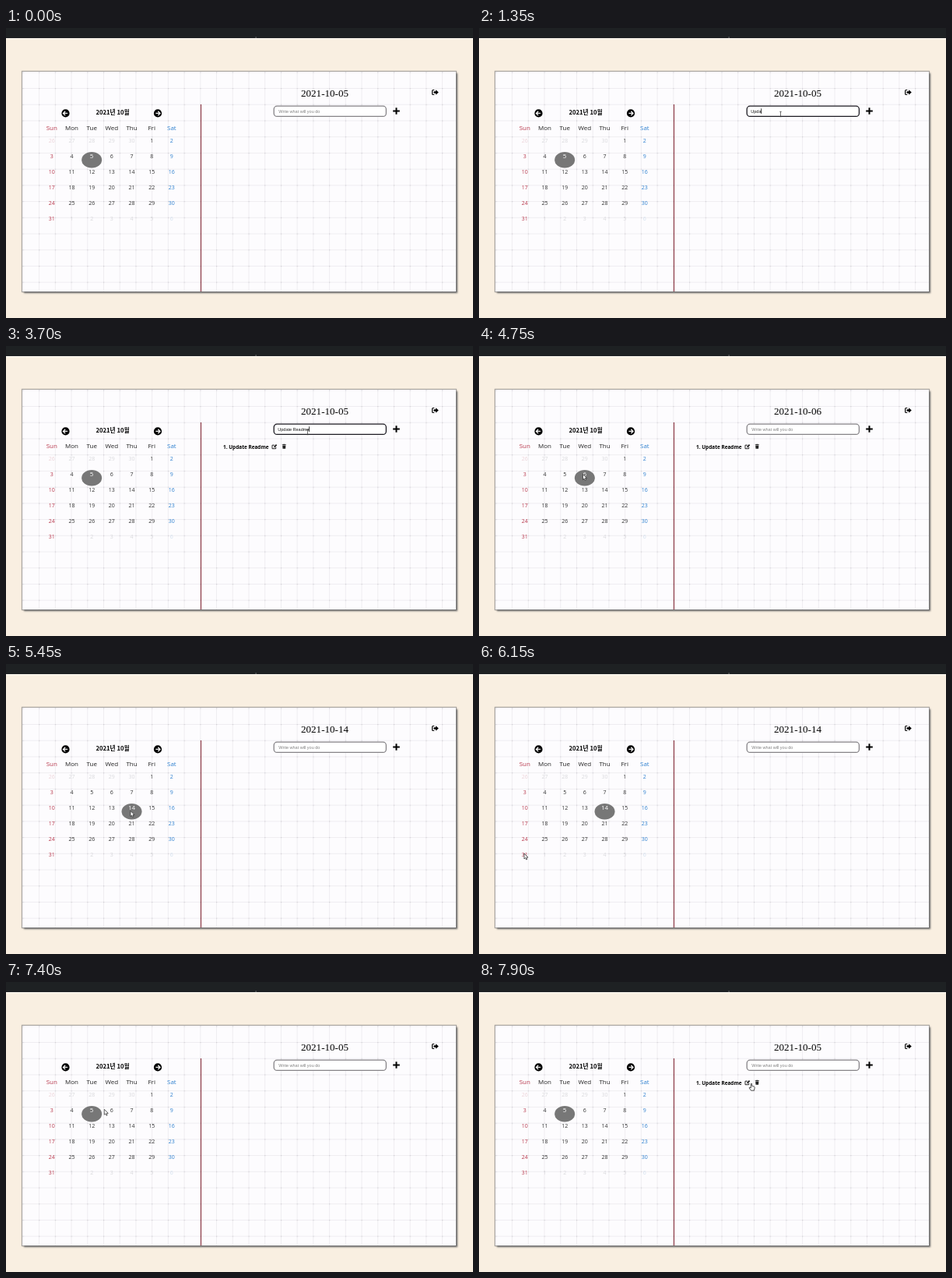
Recreate the animation shown at these times as an HTML page. Size 600 px wide and 372 px high, loop 8 s.

```html
<!DOCTYPE html>
<html lang="en">
<head>
<meta charset="utf-8">
<title>Calendar to-do</title>
<style>
  html, body { margin: 0; width: 100%; height: 100%; overflow: hidden; background: #f9efe1; }
  #bar { position: absolute; inset: 0 0 auto; height: 12.5px; background: #1e2123; box-shadow: 0 1px 1px #fffaf2; }
  #panel { position: absolute; left: 21px; top: 56px; width: 557px; height: 282px; background: #fdfcfe;
           box-shadow: 0 0 1px 1px #77777799, 2px 2px 2px #666; }
  svg { position: absolute; left: 0; top: 0; width: 600px; height: 372px; }
  text { white-space: pre; }
  .ui { font-family: "Open Sans", "Noto Sans", sans-serif; text-anchor: middle; }
  .field { font: 5.5px "Liberation Sans", Arial, sans-serif; }
</style>
</head>
<body>
<div id="bar"></div>
<div id="panel"></div>
<svg viewBox="0 0 600 372">
  <defs>
    <pattern id="grid" x="21.4" y="56.3" width="20.72" height="20.72" patternUnits="userSpaceOnUse">
      <path d="M0 .5H20.72M.5 0V20.72" stroke="#efedf1"/>
      <rect width="1.2" height="1.2" fill="#cfced3"/>
    </pattern>
    <g id="arrowIcon">
      <circle r="5.1"/>
      <path d="M-2.6 0H2.8M.3 -2.7L3 0L.3 2.7" fill="none" stroke="#fff" stroke-width="1.3"/>
    </g>
  </defs>
  <rect x="320.5" y="11.5" width="1.2" height="1.2" fill="#8a8c8d"/>
  <rect x="21" y="56" width="557" height="282" fill="url(#grid)"/>
  <path d="M250.5 98V338" stroke="#8d3b46" stroke-width="1.2"/>

  <use href="#arrowIcon" transform="translate(76.5 109.4) scale(-1 1)"/>
  <use href="#arrowIcon" transform="translate(195 109.4)"/>
  <text x="137" y="111.2" text-anchor="middle" font-size="7.7" font-weight="700"
        font-family="'Noto Sans CJK KR', 'Noto Sans CJK', sans-serif">2021년 10월</text>
  <g id="calendar" class="ui"></g>

  <text id="date" x="409.5" y="88" font-size="13.1" text-anchor="middle" font-family="'Liberation Serif', serif"></text>
  <!-- sign-out icon -->
  <path d="M550.3 79.5H548.6Q547.7 79.5 547.7 80.4V84.6Q547.7 85.5 548.6 85.5H550.3" fill="none" stroke="#000" stroke-width="1.2"/>
  <path d="M549.6 81.3H552.2V79.2L555.8 82.5L552.2 85.8V83.7H549.6Z"/>

  <rect id="box" x="344.2" y="100.2" width="144.2" height="13.2" rx="4" fill="#fff" stroke-width="1.3"/>
  <text id="entry" class="field" y="108.7"></text>
  <path id="caret" stroke="#000" stroke-width=".8"/>
  <path d="M497.2 106.5H505.8M501.5 102.2V110.8" stroke="#000" stroke-width="2"/>

  <g id="todo">
    <text class="ui" x="308.3" y="131.6" font-size="6.45" font-weight="700">1. Update Readme</text>
    <path d="M345 127.2H342V131.7H346.7V129.6" fill="none" stroke="#111" stroke-width=".9"/>
    <path d="M344 130.2L344.3 128.9L346.9 126.1L348.2 127.3L345.4 130Z" fill="#111"/>
    <path d="M354.8 126.3H356.2L356.6 125.8H358L358.4 126.3H359.8V127.1H354.8ZM355.2 127.5H359.4L359.1 131.8H355.5Z" fill="#222"/>
  </g>

  <g id="pointer" stroke-linejoin="round">
    <path data-kind="beam" d="M-1.2 -3.2H1.2M0 -3.2V3.2M-1.2 3.2H1.2" stroke="#333" stroke-width=".7"/>
    <path data-kind="arrow" d="M0 0V7L1.6 5.6L2.7 8L3.9 7.5L2.9 5.1H5Z" fill="#fff" stroke="#222" stroke-width=".7"/>
    <path data-kind="hand" d="M-.7 .6Q0 -.6 .7 .6V3.4L3.6 4.2Q4.4 4.5 4.2 5.6L3.4 9.2H-.5L-2.8 6Q-3 4.8 -1.8 5.2L-.7 6Z" fill="#fff" stroke="#222" stroke-width=".8"/>
  </g>
</svg>
<script>
const LOOP = 8000, BLINK = 500, TEXT_X = 349.3;
const PHRASE = "Update Readme";
const KEY_TIMES = [950, 1050, 1200, 1350, 1450, 1550, 1650, 2050, 2250, 2400, 2700, 3350, 3450];
const FOCUS = 150, ADDED = 3700, CLEARED = 4100, BLUR = 4500;
const SELECTIONS = [[0, 5], [4550, 6], [5350, 14], [6250, 31], [7150, 5]];
const LISTED = [[ADDED, 4900], [7450, LOOP]];
const PATH = [ // time, x, y
  [50, 387.5, 110.5], [4080, 387.5, 110.5], [4350, 160, 172], [4500, 136, 167], [4750, 133.5, 164.5],
  [4950, 135, 167], [5250, 160, 188.5], [5550, 160, 188.5], [6150, 58, 243], [6400, 58, 243],
  [6900, 101.5, 177.5], [7050, 108, 166], [7300, 108, 166], [7900, 350, 130]
];

const $ = id => document.getElementById(id);
const at = (steps, t) => steps.filter(s => s[0] <= t).pop();

function add(parent, tag, attrs, text = "") {
  const el = document.createElementNS("http://www.w3.org/2000/svg", tag);
  for (const name in attrs) el.setAttribute(name, attrs[name]);
  el.textContent = text;
  return parent.appendChild(el);
}

const columnX = c => 58.8 + 25.68 * c;
const columnColor = (c, plain) => c === 0 ? "#b8394d" : c === 6 ? "#2f80cf" : plain;

const calendar = $("calendar");
const marker = add(calendar, "ellipse", { rx: 13, ry: 10.2, fill: "#777" });
"Sun Mon Tue Wed Thu Fri Sat".split(" ").forEach((name, c) =>
  add(calendar, "text", { x: columnX(c), y: 130.8, "font-size": 8, fill: columnColor(c, "#222") }, name));

const days = {};
for (let i = 0; i < 42; i++) {
  const day = i - 4, c = i % 7, row = Math.floor(i / 7);
  const inMonth = day >= 1 && day <= 31;
  const label = day < 1 ? day + 30 : day > 31 ? day - 31 : day;
  const color = inMonth ? columnColor(c, "#333") : c === 0 ? "#ecd3d8" : c === 6 ? "#d3dfed" : "#d9d9dc";
  const el = add(calendar, "text", { x: columnX(c), y: 147.1 + 20.05 * row, "font-size": 7, fill: color }, label);
  if (inMonth) days[day] = { el, color, x: columnX(c), y: 149.2 + 20.05 * row };
}

function select(day) {
  for (const d in days) {
    const on = +d === day;
    days[d].el.setAttribute("fill", on ? "#fff" : days[d].color);
    days[d].el.setAttribute("font-size", on ? 8 : 7);
  }
  marker.setAttribute("cx", days[day].x);
  marker.setAttribute("cy", days[day].y);
  $("date").textContent = "2021-10-" + String(day).padStart(2, "0");
}

function drawField(t) {
  const focused = t >= FOCUS && t < BLUR;
  const typed = t < CLEARED ? PHRASE.slice(0, KEY_TIMES.filter(k => k <= t).length) : "";
  const entry = $("entry");
  entry.textContent = typed || "Write what will you do";
  entry.setAttribute("x", typed ? TEXT_X : TEXT_X + 1);
  entry.setAttribute("fill", typed ? "#111" : "#808080");
  $("box").setAttribute("stroke", focused ? "#1c1a22" : "#858387");

  const lastInput = [FOCUS, ...KEY_TIMES, CLEARED].filter(k => k <= t).pop();
  const lit = focused && Math.floor((t - lastInput) / BLINK) % 2 === 0;
  const x = TEXT_X + (typed ? entry.getComputedTextLength() : 0) + .2;
  $("caret").setAttribute("d", lit ? `M${x} 103.3V109.9` : "");
}

function drawPointer(t) {
  const pointer = $("pointer");
  pointer.style.display = t < PATH[0][0] ? "none" : "";
  const i = Math.max(0, PATH.findIndex(p => p[0] > t) - 1);
  const last = PATH[PATH.length - 1];
  const [from, to] = t >= last[0] ? [last, last] : [PATH[i], PATH[i + 1]];
  const u = Math.min(1, Math.max(0, (t - from[0]) / (to[0] - from[0] || 1)));
  const ease = u * u * (3 - 2 * u);
  const [x, y] = [1, 2].map(k => from[k] + (to[k] - from[k]) * ease);
  pointer.setAttribute("transform", `translate(${x} ${y})`);
  const kind = t < 4130 ? "beam" : t > 7300 && x > 340 ? "hand" : "arrow";
  for (const shape of pointer.children) shape.style.display = shape.dataset.kind === kind ? "" : "none";
}

function draw(now) {
  const t = now % LOOP;
  select(at(SELECTIONS, t)[1]);
  $("todo").style.display = LISTED.some(([from, to]) => t >= from && t < to) ? "" : "none";
  drawField(t);
  drawPointer(t);
}

const start = performance.now();
function tick() {
  draw(performance.now() - start);
  requestAnimationFrame(tick);
}
tick();
</script>
</body>
</html>
```
